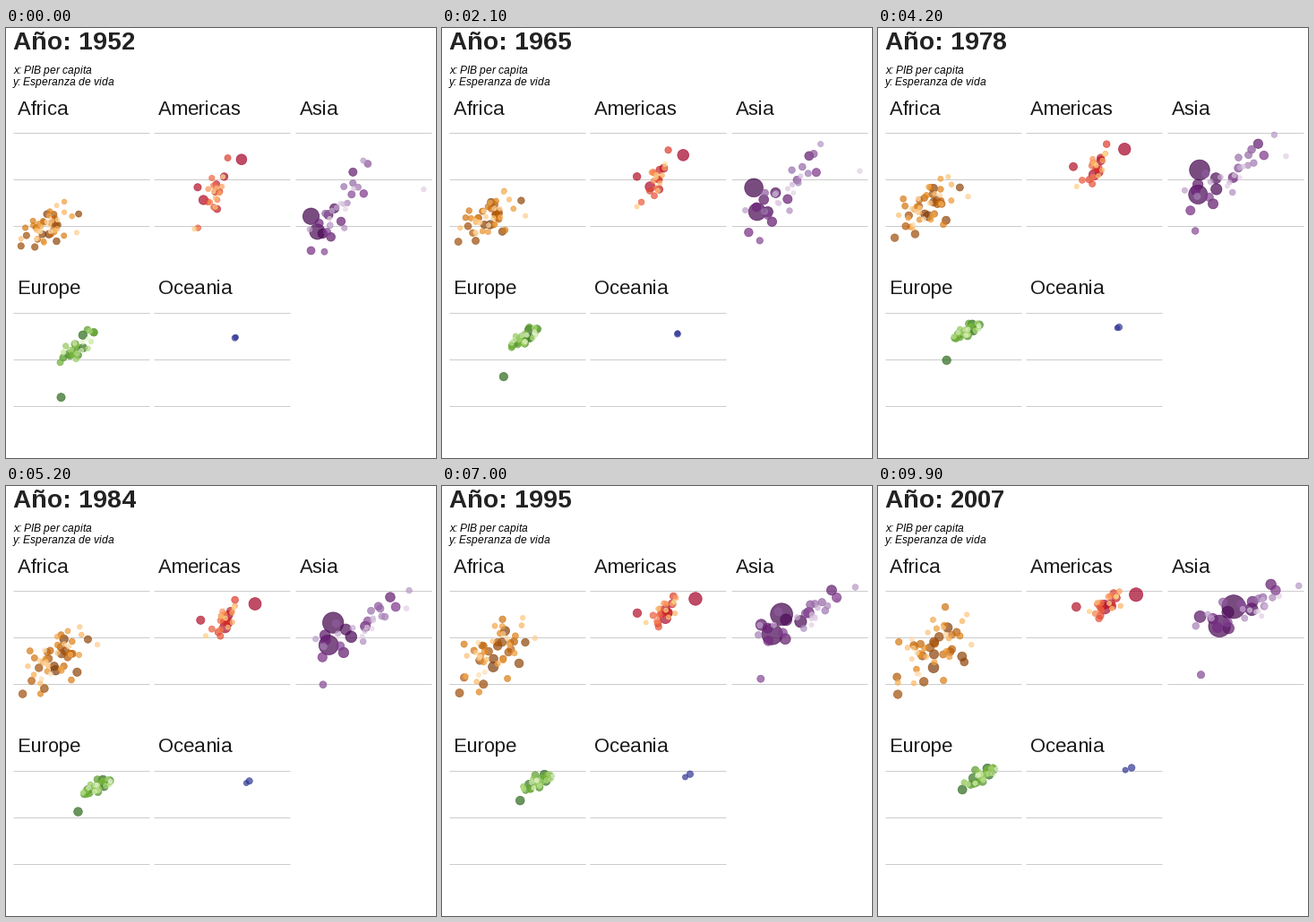
Animation of 480 by 480 pixels, one loop 10 s. Source, as a matplotlib script:

```python
import numpy as np
import matplotlib.pyplot as plt
from matplotlib.animation import FuncAnimation
from matplotlib.colors import LinearSegmentedColormap

SIZE, DPI = 480, 72
FRAMES, MOVING, INTERVAL = 100, 89, 100
START, END = 1952, 2007
KEYS = START, 1970, 1990, END
PX_PER_DECADE, PX_PER_YEAR, LOG_LEFT = 51.7, 2.6, 2.26

rng = np.random.default_rng(11)
years = START + (END - START) * np.minimum(np.arange(FRAMES) / MOVING, 1)
progress = (years - START) / (END - START)

# column, row, share of the final population at the start, colour ramp
PANELS = {
    "Africa": (0, 0, .27, ["#7F3B08", "#B35806", "#E08214", "#FDB863", "#FEE0B6"]),
    "Americas": (1, 0, .45, ["#A50026", "#D73027", "#F46D43", "#FDAE61", "#FEE090"]),
    "Asia": (2, 0, .4, ["#40004B", "#762A83", "#9970AB", "#C2A5CF", "#E7D4E8"]),
    "Europe": (0, 1, .72, ["#276419", "#4D9221", "#7FBC41", "#B8E186", "#E6F5D0"]),
    "Oceania": (1, 1, .43, ["#313695", "#4575B4"]),
}
tracks, shades = [], []


def origin(panel):
    col, row = PANELS[panel][:2]
    return 8 + 157.4 * col, 221 + 201 * row


def over_time(values):
    return np.interp(years, KEYS, values)


def add_dot(panel, rank, pop, log_gdp, life):
    """rank runs from 0 (most people, darkest) to 1; pop is in millions."""
    left, base = origin(panel)
    share, ramp = PANELS[panel][2:]
    people = pop * (share + (1 - share) * progress)
    x = left + PX_PER_DECADE * (log_gdp - LOG_LEFT)
    y = base - .4 - PX_PER_YEAR * (life - 40)
    tracks.append((x, y, 2.49 + 10.66 * np.sqrt(people / 1319)))
    shades.append(LinearSegmentedColormap.from_list(panel, ramp)(rank, alpha=.7))


def lead(panel, rank, pop, gdp, life):
    add_dot(panel, rank, pop, over_time(np.log10(gdp)), over_time(life))


def crowd(panel, count, top_pop, slant, gdp, gdp_spread, life, life_spread):
    """A slanted cloud whose centre and width follow the key dates."""
    for rank in np.linspace(.03, 1, count):
        # each dot slowly swaps one random place in the cloud for another
        here, there = np.clip(rng.normal(size=(2, 2, 1)), -1.9, 1.9)
        turn = .8 * progress
        u, w = here * np.cos(turn) + there * np.sin(turn)
        v = slant * u + np.sqrt(1 - slant ** 2) * w
        add_dot(panel, rank, top_pop * (1.02 - rank) ** 3,
                over_time(gdp) + over_time(gdp_spread) * u,
                np.minimum(over_time(life) + over_time(life_spread) * v, 82))


lead("Africa", .08, 44, (4725, 7400, 7500, 9270), (45, 53, 61.5, 49.3))
lead("Africa", .88, 1.5, (4293, 10300, 12800, 13206), (37, 47, 60.8, 56.7))
lead("Africa", .5, 9, (493, 560, 780, 863), (40, 44.4, 32, 46.2))
lead("Africa", 0, 135, (1077, 1550, 1480, 2014), (36.3, 42, 47.3, 46.9))
lead("Americas", .04, 190, (2109, 4400, 7100, 9066), (51, 58.9, 66.3, 72.4))
lead("Americas", 0, 301, (13990, 20700, 30800, 42952), (68.4, 71, 75.6, 78.2))
lead("Asia", .35, 32, (779, 745, 720, 975), (28.8, 35.4, 41.3, 43.8))
lead("Asia", 0, 1319, (400, 640, 1560, 4959), (44, 61, 68.3, 73))
lead("Asia", .03, 1110, (547, 715, 1090, 2452), (37.4, 49.2, 59.6, 64.7))
lead("Asia", .15, 127, (3217, 12900, 24900, 31656), (63, 72.6, 79, 82.6))
lead("Asia", .97, 2.5, (108382, 109000, 32000, 47307), (55.6, 66.5, 74.7, 77.6))
lead("Europe", .03, 71, (1969, 3100, 5400, 8458), (43.6, 55.9, 65, 71.8))
lead("Oceania", 0, 20.4, (10040, 15900, 23000, 34435), (69.1, 71.4, 77.2, 81.2))
lead("Oceania", 1, 4.1, (10557, 15700, 18700, 25185), (69.4, 71.8, 75.8, 80.2))

crowd("Africa", 48, 90, .5, (2.98, 3.12, 3.16, 3.23), (.29, .33, .37, .42),
      (39.2, 45, 53, 55), (4.8, 5.8, 8, 9.5))
crowd("Americas", 23, 80, .65, (3.51, 3.68, 3.74, 3.93), (.2, .2, .23, .27),
      (53.5, 61.8, 69.3, 73.7), (8.5, 6.5, 4.6, 3.6))
crowd("Asia", 28, 240, .75, (3.2, 3.45, 3.67, 3.88), (.33, .48, .56, .57),
      (47.3, 57, 66.5, 71.3), (8.5, 8.5, 6.5, 5.8))
crowd("Europe", 29, 85, .85, (3.67, 3.98, 4.12, 4.34), (.26, .2, .26, .25),
      (65.2, 70.7, 74, 77.7), (4.5, 2.2, 2.4, 2.7))
tracks = np.array(tracks)

# whole-pixel letter spacing
plt.rcParams.update({"font.family": "Liberation Sans", "text.hinting_factor": 1})
fig = plt.figure(figsize=(SIZE / DPI, SIZE / DPI), dpi=DPI, facecolor="white")
ax = fig.add_axes([0, 0, 1, 1])
ax.set(xlim=(0, SIZE), ylim=(SIZE, 0))
ax.axis("off")

title = ax.text(8, 24, "", size=28, weight="bold", color="#222222")
ax.text(8, 51, "x: PIB per capita", size=12, style="italic", color="black")
ax.text(8, 64, "y: Esperanza de vida", size=12, style="italic", color="black")
for panel, (_, row, *_) in PANELS.items():
    left, base = origin(panel)
    ax.text(left + 5, 97 + 200 * row, panel, size=22, color="#1a1a1a")
    for y in base - .5 - 52 * np.arange(3):
        ax.plot([left, left + 152], [y, y], color="#cccccc", lw=1,
                solid_capstyle="butt", zorder=1)

dots = ax.scatter(tracks[:, 0, 0], tracks[:, 1, 0], c=shades, edgecolors=shades,
                  linewidths=.71, zorder=2)


def draw(i):
    x, y, radius = tracks[:, :, i].T
    dots.set_offsets(np.column_stack([x, y]))
    dots.set_sizes((2 * radius) ** 2)
    title.set_text(f"Año: {years[i]:.0f}")
    return dots, title


anim = FuncAnimation(fig, draw, frames=FRAMES, interval=INTERVAL, repeat=True, repeat_delay=0)
plt.show()
```
